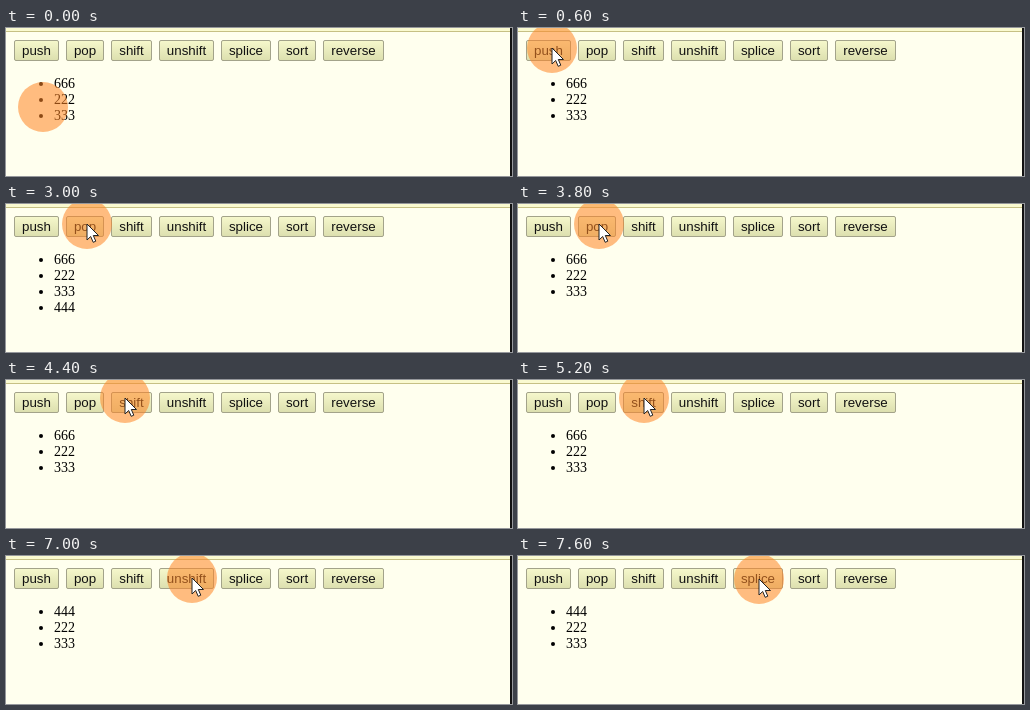
Animation of 506x148 px, one loop 8 s. Source, as an HTML page:

```html
<!DOCTYPE html>
<html lang="en">
<head>
<meta charset="utf-8">
<title>Array methods</title>
<style>
  html, body { margin: 0; width: 100%; height: 100%; overflow: hidden; background: #ffffee; }
  svg { display: block; }
  .button rect { fill: url(#face); stroke: #a3a38a; }
  .button text { font: 13.33px "Liberation Sans", Arial, sans-serif; text-anchor: middle; fill: #111; }
  #list text { font: 14px "Liberation Serif", "Times New Roman", serif; }
</style>
</head>
<body>
<svg width="506" height="148" viewBox="0 0 506 148">
  <defs>
    <linearGradient id="face" x2="0" y2="1">
      <stop offset="0" stop-color="#f6f8cc"/>
      <stop offset="1" stop-color="#dcdfae"/>
    </linearGradient>
  </defs>
  <rect width="506" height="3" fill="#fafad0"/>
  <rect y="3" width="506" height="1" fill="#c6c084"/>
  <g id="buttons"></g>
  <g id="list"></g>
  <rect x="504" width="2" height="148" fill="#111"/>
  <g id="pointer">
    <circle r="25" fill="#ff8526" fill-opacity=".55"/>
    <path id="arrow" d="M0 0V16L3.7 12.5L6.2 18.3L8.8 17.2L6.3 11.5H11.5Z" fill="#fff" stroke="#222"/>
  </g>
</svg>
<script>
const LOOP = 8000, STEP = 200;
const $ = id => document.getElementById(id);

// label, left edge, width
const buttons = [
  ["push", 8, 45], ["pop", 60, 38], ["shift", 105, 41], ["unshift", 153, 55],
  ["splice", 215, 50], ["sort", 272, 38], ["reverse", 317, 61]
];
$("buttons").innerHTML = buttons.map(([label, x, w]) =>
  `<g class="button"><rect x="${x + .5}" y="12.5" width="${w - 1}" height="20" rx="1.5"/>
   <text x="${x + w / 2}" y="27">${label}</text></g>`).join("");

// time, x, y: the pointer rests on a button, then glides to the next
const path = [
  [0, 37, 79], [600, 34, 20], [2000, 34, 20], [2200, 36, 16],
  [2800, 81, 20], [3800, 81, 20], [4600, 126, 18], [5400, 126, 18],
  [6000, 186, 22], [7200, 186, 22], [7600, 241, 23], [LOOP, 241, 23]
];
// time, list contents from then on
const states = [
  [0, "666 222 333"], [1600, "666 222 333 444"], [3400, "666 222 333"],
  [5400, "222 333"], [6600, "444 222 333"]
];

const ease = k => k * k * (3 - 2 * k);

function pointerAt(t) {
  const i = path.findIndex(p => p[0] > t);
  const [t0, x0, y0] = path[i - 1], [t1, x1, y1] = path[i];
  const k = ease((t - t0) / (t1 - t0));
  return [x0 + (x1 - x0) * k, y0 + (y1 - y0) * k].map(Math.round);
}

let shown;
function draw(now) {
  requestAnimationFrame(draw);
  const t = Math.floor(now % LOOP / STEP) * STEP;
  if (t === shown) return;
  shown = t;
  const items = states.filter(s => s[0] <= t).pop()[1].split(" ");
  $("list").innerHTML = items.map((item, i) =>
    `<circle cx="35" cy="${56 + 16 * i}" r="2"/><text x="48" y="${60 + 16 * i}">${item}</text>`).join("");
  $("pointer").setAttribute("transform", `translate(${pointerAt(t)})`);
  $("arrow").setAttribute("visibility", t ? "visible" : "hidden");
}
draw(performance.now());
</script>
</body>
</html>
```
